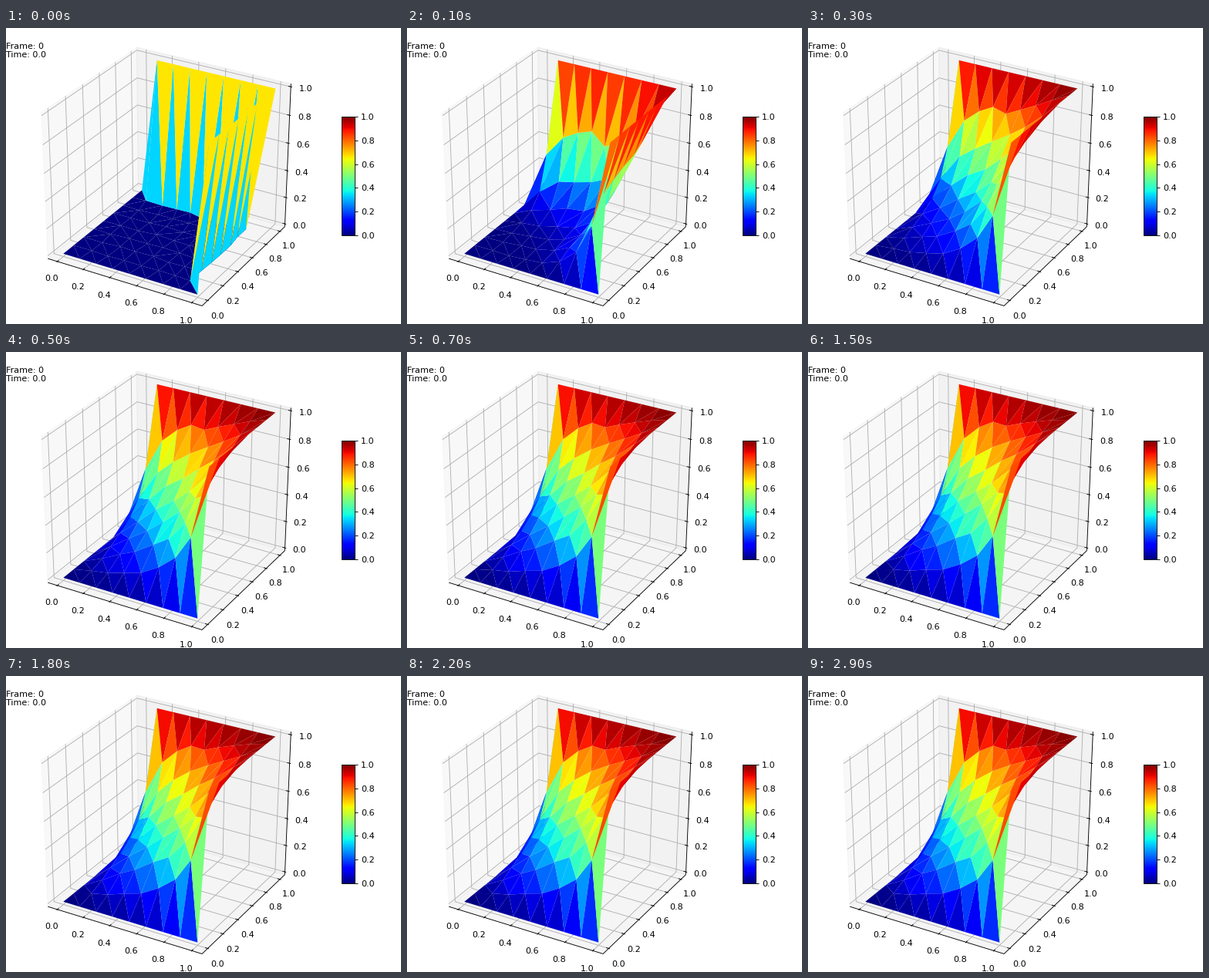
A matplotlib script that plays this animation: 512x384 px, repeating every 3.3 s.

```python
import numpy as np
import matplotlib.pyplot as plt
from matplotlib.animation import FuncAnimation
from matplotlib.cm import ScalarMappable
from matplotlib.collections import PolyCollection
from matplotlib.colors import Normalize
from matplotlib.tri import Triangulation

W, H, DPI = 512, 384, 80
FRAMES, LAST_STEP, SUBSTEPS, DT = 33, 29, 5, 0.0054
plt.rcParams["font.family"] = "DejaVu Sans"
plt.rcParams["font.size"] = 10

fig = plt.figure(figsize=(W / DPI, H / DPI), dpi=DPI, facecolor="white")
ax = fig.add_axes([0, 0, 1, 1])
ax.set_xlim(0, W)
ax.set_ylim(H, 0)
ax.axis("off")

# ---- perspective view of the unit cube, azimuth -60, elevation 30 ----
EYE = np.array([np.cos(np.pi / 6) * 0.5, -0.75, 0.5])
RIGHT = np.array([np.sqrt(3) / 2, 0.5, 0])
UP = np.cross(EYE, RIGHT)
DIST = 10
SCALE_X, SCALE_Y = 0.8 * W / 0.185, H / 0.185


def project(p):
    """Unit cube coordinates to pixels and depth."""
    rel = np.asarray(p, float) - 0.5
    depth = DIST - rel @ EYE
    px = SCALE_X * (0.095 + rel @ RIGHT / depth)
    py = SCALE_Y * (0.09 - rel @ UP / depth)
    return px, py, depth


def unit(v):
    """Data value on the x or y axis to cube coordinate."""
    return (v + 0.05) / 1.1


def line(points, color="black", z=3):
    px, py, _ = project(points)
    ax.plot(px, py, color=color, lw=0.8, zorder=z, solid_capstyle="butt")


# ---- panes, grid, axes and tick labels ----
LO, HI = -1 / 48, 49 / 48
DELTA = 1 / 12
LABEL = 11.5 * 48 / (72 * (0.8 * W + H) / DPI) * DELTA


def pane(corners, shade):
    px, py, _ = project(corners)
    ax.fill(px, py, facecolor=(shade,) * 3 + (0.5,),
            edgecolor=(shade,) * 3 + (0.5,), lw=1, zorder=1)


pane([(LO, LO, LO), (LO, HI, LO), (LO, HI, HI), (LO, LO, HI)], 0.95)
pane([(LO, HI, LO), (HI, HI, LO), (HI, HI, HI), (LO, HI, HI)], 0.90)
pane([(LO, LO, LO), (HI, LO, LO), (HI, HI, LO), (LO, HI, LO)], 0.925)

line([(LO, LO, LO), (HI, LO, LO)])
line([(HI, LO, LO), (HI, HI, LO)])
line([(HI, HI, LO), (HI, HI, HI)])


def label(pos, value):
    px, py, _ = project(pos)
    ax.text(px, py, f"{value:.1f}", ha="center", va="top", zorder=6)


OUT, IN = 0.1 * DELTA, 0.2 * DELTA
for v in np.arange(6) / 5:
    u = unit(v)
    line([(u, LO, LO), (u, HI, LO), (u, HI, HI)], "#b0b0b0", 2)
    line([(HI, u, LO), (LO, u, LO), (LO, u, HI)], "#b0b0b0", 2)
    line([(LO, LO, v), (LO, HI, v), (HI, HI, v)], "#b0b0b0", 2)
    line([(u, LO - OUT, LO), (u, LO + IN, LO)])
    line([(HI + OUT, u, LO), (HI - IN, u, LO)])
    line([(HI + OUT, HI, v), (HI - IN, HI, v)])
    label((u, LO - LABEL, LO - LABEL), v)
    label((HI + LABEL, u, LO - LABEL), v)
    label((HI + LABEL, HI + LABEL, v), v)

ax.text(0, 27, "Frame: 0", zorder=6)
ax.text(0, 38, "Time: 0.0", zorder=6)

# ---- colour bar ----
norm = Normalize(0, 1)
cax = fig.add_axes([0.85, 0.3, 0.4 * H / 9 / W, 0.4])
fig.colorbar(ScalarMappable(norm, "jet"), cax=cax, ticks=np.arange(6) / 5)


# ---- triangle mesh on the unit square ----
def make_points():
    rng = np.random.default_rng(4)
    s = np.arange(8) / 8
    edge = [(t, 0) for t in s] + [(1, t) for t in s]
    edge += [(1 - t, 1) for t in s] + [(0, 1 - t) for t in s]
    x, y = np.meshgrid(np.arange(1, 8) / 8, np.arange(1, 7) / 8)
    bend = 0.03 * np.sin(np.pi * x) * np.sin(np.pi * y)
    inner = np.stack([x + bend, y + bend / 3], -1)
    inner += rng.uniform(-0.01, 0.01, inner.shape)
    inner[0, -1] = 0.88, 0.12
    back = [(0.1, 0.885), (0.235, 0.88), (0.345, 0.885), (0.447, 0.89),
            (0.56, 0.86), (0.66, 0.867), (0.77, 0.873), (0.88, 0.88)]
    return np.vstack([edge, inner.reshape(-1, 2), back])


pts = make_points()
tris = Triangulation(pts[:, 0], pts[:, 1]).triangles


# ---- heat equation, linear elements with lumped mass ----
def assemble():
    n = len(pts)
    stiff, mass = np.zeros((n, n)), np.zeros(n)
    for t in tris:
        a, b, c = pts[t]
        sides = np.array([c - b, a - c, b - a])
        area = abs(sides[0, 0] * sides[1, 1] - sides[0, 1] * sides[1, 0]) / 2
        if area < 1e-9:
            continue
        stiff[np.ix_(t, t)] += sides @ sides.T / (4 * area)
        mass[t] += area / 3
    return stiff, mass


def solve():
    x, y = pts.T
    fixed = (x == 0) | (x == 1) | (y == 0) | (y == 1)
    hot = ((x == 1) & (y > 0)) | ((y == 1) & (x > 0))
    z = hot.astype(float)
    stiff, mass = assemble()
    free = ~fixed
    system = np.diag(mass[free]) + DT * stiff[np.ix_(free, free)]
    inverse = np.linalg.inv(system)
    source = DT * stiff[np.ix_(free, fixed)] @ z[fixed]
    states = [z.copy()]
    for _ in range(LAST_STEP):
        for _ in range(SUBSTEPS):
            z[free] = inverse @ (mass[free] * z[free] - source)
        states.append(z.copy())
    return states


states = solve()
surface = PolyCollection([], cmap="jet", norm=norm, edgecolors="none",
                         linewidths=0, zorder=5)
ax.add_collection(surface, autolim=False)


def draw(i):
    z = states[min(i, LAST_STEP)]
    px, py, depth = project(np.column_stack([unit(pts), z]))
    order = np.argsort((1 / depth)[tris].mean(axis=1))
    shown = tris[order]
    surface.set_verts(np.stack([px, py], -1)[shown])
    surface.set_array(z[shown].mean(axis=1))
    return [surface]


anim = FuncAnimation(fig, draw, frames=FRAMES, interval=100, repeat=True,
                     repeat_delay=0, init_func=lambda: draw(0))
plt.show()
```
